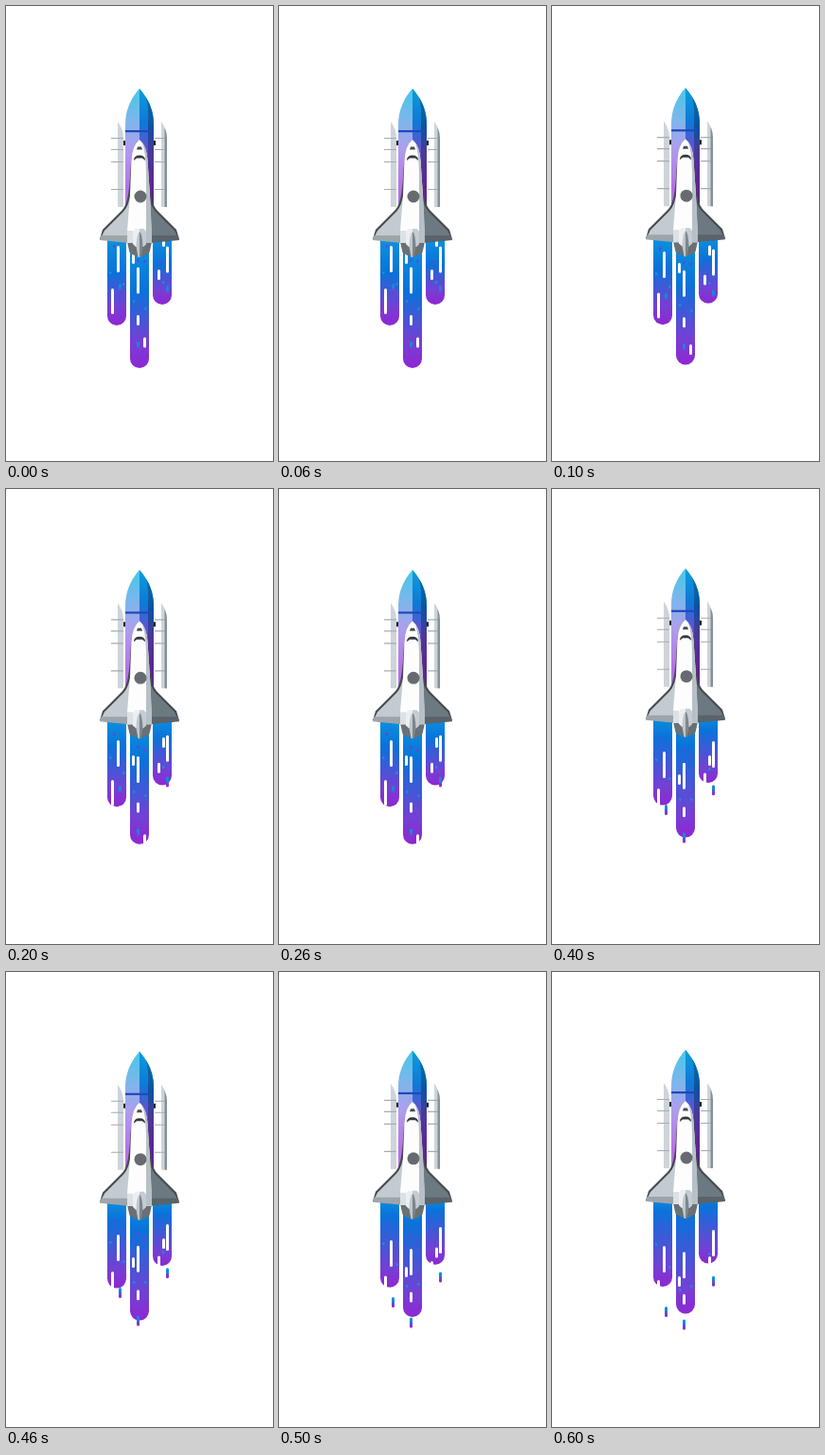
An HTML page for the animation above (0.7 s loop, 282 by 480 pixels).

```html
<!DOCTYPE html>
<html lang="en">
<head>
<meta charset="utf-8">
<title>Shuttle</title>
<style>
html, body { margin: 0; width: 100%; height: 100%; overflow: hidden; background: #fff; }
svg { display: block; width: 100vw; height: 100vh; }
</style>
</head>
<body>
<svg viewBox="0 0 282 480">
  <defs>
    <linearGradient id="flame" x1="0" y1="0" x2="0" y2="1">
      <stop offset="0" stop-color="#0c9be0"/>
      <stop id="deepBlue" offset=".45" stop-color="#0a72da"/>
      <stop offset=".8" stop-color="#7440d4"/>
      <stop offset="1" stop-color="#8f26d4"/>
    </linearGradient>
    <linearGradient id="drop" x1="0" y1="0" x2="0" y2="1">
      <stop offset=".35" stop-color="#0a8edb"/>
      <stop offset=".75" stop-color="#8a30d2"/>
    </linearGradient>
    <linearGradient id="tankLight" gradientUnits="userSpaceOnUse" x1="0" y1="87" x2="0" y2="192">
      <stop offset="0" stop-color="#45c8e8"/>
      <stop offset=".35" stop-color="#82b4ec"/>
      <stop offset=".6" stop-color="#ae9eec"/>
      <stop offset="1" stop-color="#b673e4"/>
    </linearGradient>
    <linearGradient id="tank" gradientUnits="userSpaceOnUse" x1="0" y1="87" x2="0" y2="192">
      <stop offset="0" stop-color="#0c9cdb"/>
      <stop offset=".35" stop-color="#0f78d6"/>
      <stop offset=".6" stop-color="#6352d2"/>
      <stop offset="1" stop-color="#8d2fd0"/>
    </linearGradient>
    <linearGradient id="tankShade" gradientUnits="userSpaceOnUse" x1="0" y1="87" x2="0" y2="192">
      <stop offset="0" stop-color="#0b76ad"/>
      <stop offset=".4" stop-color="#0d529c"/>
      <stop offset=".65" stop-color="#4a3a98"/>
      <stop offset="1" stop-color="#5f2394"/>
    </linearGradient>
  </defs>
  <g id="fire"></g>
  <g id="ship">
    <g id="booster">
      <path d="M118 122Q124 130 124 140V212H118Z" fill="#ced4d9"/>
      <path d="M111 139.5H124M111 151.5H124M111 164.5H124M111 193.5H124" stroke="#a4acb2" stroke-width="1.1"/>
    </g>
    <use href="#booster" x="46"/>
    <path d="M167.5 128Q170 134 170 140V212H167.5Z" fill="#85919a"/>
    <path d="M124 142h3v5h-3ZM155 142h3v5h-3Z" fill="#1d2025"/>
    <path d="M141 87Q126 104 126 125V212H141Z" fill="url(#tankLight)"/>
    <path d="M141 87Q156 104 156 125V212H141Z" fill="url(#tank)"/>
    <path d="M148 96.5Q156 109 156 125V212H150V125Q151 108 148 96.5Z" fill="url(#tankShade)"/>
    <path d="M126 131h30v2.2h-30Z" fill="#1f49b8"/>
    <g id="wingEdge">
      <path d="M132.5 155Q131 192 128 204Q126 212 122 216L102 236L99 246L130 249Z" fill="#454b50"/>
    </g>
    <use href="#wingEdge" transform="matrix(-1 0 0 1 282 0)"/>
    <path d="M132 195Q130 211 124 217L104 237L101 243H130Z" fill="#c3cbd1"/>
    <path d="M150 195Q152 211 158 217L178 237L181 243H152Z" fill="#6d7980"/>
    <path d="M100.5 242H130V250L99 247Z" fill="#9ea5aa"/>
    <path d="M181.5 242H152V250L183 247Z" fill="#596369"/>
    <path d="M128 249H154L151.5 260L145 264H137L130.5 260Z" fill="#6a7074"/>
    <path d="M141 141Q133.5 147 132.5 163L131 200L128 237V250H154L152 200L149.5 163Q148.5 147 141 141Z" fill="#fdfdfd"/>
    <path d="M143 143Q148.5 149 149.5 163L152 200L154 237V250H148V180Q148 152 143 143Z" fill="#b7c0c7"/>
    <path d="M128 237H134V250H128Z" fill="#dce1e5"/>
    <path d="M134 238L136.5 235H145.5L148 238V251L145 254H137L134 251Z" fill="#eceff1"/>
    <path d="M141 235H145.5L148 238V251L145 254H141Z" fill="#c5ccd2"/>
    <path d="M138 151.5L139 148.5H143L144 151.5Z" fill="#484c51"/>
    <path d="M135 163Q135 157.5 141 157.5T147 163L144 160.5H138Z" fill="#33373c"/>
    <circle cx="142" cy="201" r="6.5" fill="#676b70"/>
    <path d="M141 238Q138 240 137.5 254L139.5 265H141Z" fill="#c0c7cc"/>
    <path d="M141 238Q144 240 144.5 254L142.5 265H141Z" fill="#7c868d"/>
  </g>
</svg>
<script>
const STEP = 100, STEPS = 7;
const fire = document.getElementById("fire");
const ship = document.getElementById("ship");
const deepBlue = document.getElementById("deepBlue");

function pill(parent, x, width, fill) {
  const el = document.createElementNS("http://www.w3.org/2000/svg", "rect");
  el.setAttribute("x", x);
  el.setAttribute("width", width);
  el.setAttribute("rx", width / 2);
  el.setAttribute("fill", fill);
  return parent.appendChild(el);
}

function place(el, y, height) {
  el.setAttribute("y", y);
  el.setAttribute("height", height);
}

// speed is in pixels per step
const flames = [
  { x: 107, end: 337, speed: -0.85 },
  { x: 131, end: 382, speed: -3.6 },
  { x: 155, end: 315, speed: -1.25 }
];
const purple = "#6a42d2", teal = "#128fdc";
const specks = [
  { x: 113, y: 252, speed: 2.5, fill: purple },
  { x: 109, y: 280, speed: 1, fill: teal },
  { x: 123, y: 292, speed: 3, fill: teal },
  { x: 145, y: 268, speed: 3, fill: purple },
  { x: 138, y: 267, speed: 2, fill: purple },
  { x: 134, y: 310, speed: 4, fill: teal },
  { x: 146, y: 318, speed: 2, fill: teal },
  { x: 163, y: 268, speed: 3, fill: purple },
  { x: 165, y: 290, speed: 1, fill: teal }
];
const drops = [
  { x: 119, y: 293, speed: 10 },
  { x: 138, y: 354, speed: 2.1 },
  { x: 169, y: 295, speed: 4.3 }
];
const dashes = [
  { x: 117, y: 253, speed: 6, length: 28 },
  { x: 111, y: 298, speed: 4.5, length: 27 },
  { x: 133, y: 261, speed: 10, length: 11 },
  { x: 138, y: 275.5, speed: 3.3, length: 28 },
  { x: 138, y: 326, speed: 2.3, length: 11 },
  { x: 145, y: 349.5, speed: 7.4, length: 11 },
  { x: 160, y: 278, speed: 5.4, length: 11 },
  { x: 165, y: 243, speed: 9.5, length: 11 },
  { x: 169, y: 253.5, speed: 3.1, length: 28 }
];

for (const f of flames) f.el = pill(fire, f.x, 20, "url(#flame)");
for (const s of specks) s.el = pill(fire, s.x, 2.5, s.fill);
for (const d of drops) d.el = pill(fire, d.x, 3, "url(#drop)");
for (const d of dashes) d.el = pill(fire, d.x, 3, "#fff");

function draw(time) {
  const step = Math.floor(time / STEP) % STEPS;
  const lift = -step * 0.83;
  const top = 236 + lift;
  ship.setAttribute("transform", `translate(0 ${lift})`);
  deepBlue.setAttribute("offset", 0.45 - 0.04 * step);
  for (const f of flames) place(f.el, top, f.end + f.speed * step - top);
  for (const s of specks) place(s.el, s.y + s.speed * step, 3);
  for (const d of drops) place(d.el, d.y + d.speed * step, 11);
  for (const d of dashes) place(d.el, d.y + d.speed * step, d.length);
}

const start = performance.now();
function tick() {
  draw(performance.now() - start);
  requestAnimationFrame(tick);
}
tick();
</script>
</body>
</html>
```
